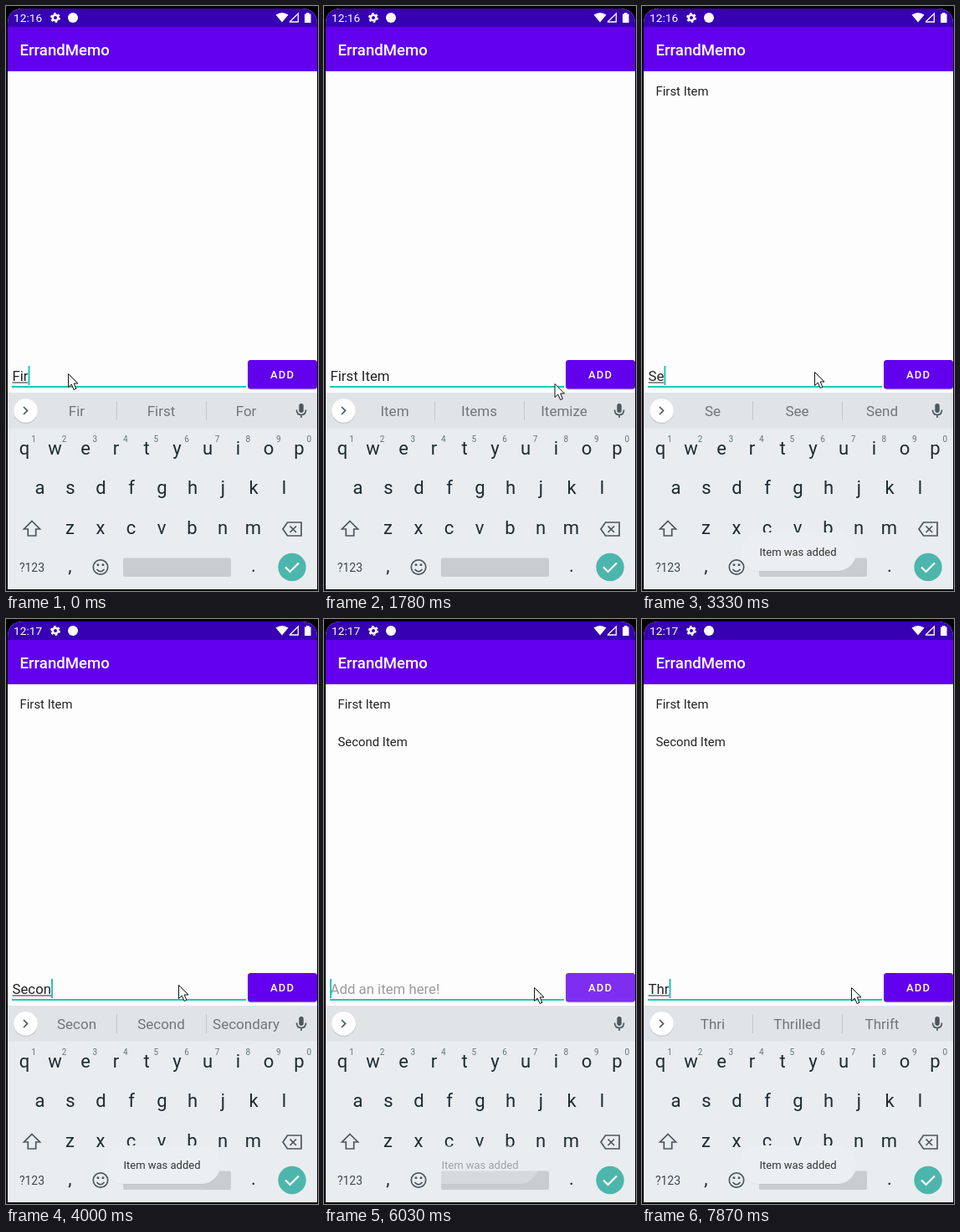
Write an HTML page that moves like this. It is 373 by 699 pixels and loops after 7.99 s.

```html
<!DOCTYPE html>
<html lang="en">
<head>
<meta charset="utf-8">
<title>To-do list demo</title>
<style>
  html, body { margin: 0; width: 100%; height: 100%; overflow: hidden; background: #000; }
  svg { display: block; width: 373px; height: 699px; font-family: Roboto, sans-serif; }
  text { white-space: pre; }
  .mid { text-anchor: middle; }
  .key { font-size: 22px; fill: #1d2b32; }
  .hint { font-size: 10px; fill: #66737a; }
  .small { font-size: 14px; fill: #3c484f; }
  .suggest { font-size: 17px; fill: #6f767b; }
  .item { font-size: 14.9px; fill: #222; }
  .line { fill: none; stroke: #4b575e; stroke-width: 1.7; }
</style>
</head>
<body>
<svg viewBox="0 0 373 699">
  <clipPath id="screen"><path d="M2 697V22Q2 3 21 3H353Q372 3 372 22V697Z"/></clipPath>
  <g clip-path="url(#screen)">
    <rect width="373" height="699" fill="#fdfdfd"/>
    <rect width="373" height="26" fill="#3700b3"/>
    <rect y="25" width="373" height="53" fill="#6200ee"/>

    <!-- status bar -->
    <g fill="#fff">
      <text id="clock" x="9" y="19" font-size="13.7"></text>
      <circle cx="59" cy="14" r="3.3" fill="none" stroke="#fff" stroke-width="2.6"/>
      <circle cx="59" cy="14" r="5.1" fill="none" stroke="#fff" stroke-width="1.8" stroke-dasharray="2.67"/>
      <circle cx="80" cy="14" r="6"/>
      <path d="M322.500 10.500Q330 5.500 337.500 10.500L330 19.500Z"/>
      <path d="M339.500 19V18.500L349.300 9V19Z" fill="none" stroke="#fff" stroke-width="1.3"/>
      <path d="M357 9.500H359V8H362.500V9.500H364.500V20H357Z"/>
    </g>
    <text x="16.500" y="59" font-size="18.600" font-weight="500" fill="#fff">ErrandMemo</text>

    <text class="item" id="first" x="16.500" y="106.500">First Item</text>
    <text class="item" id="second" x="16.500" y="151.500">Second Item</text>

    <!-- entry row -->
    <text id="hint" x="7.500" y="448" font-size="16.800" fill="#9a9a9a">Add an item here!</text>
    <text id="entry" x="7.500" y="448" font-size="16.800" fill="#222"></text>
    <rect id="underline" y="449.500" height="1" fill="#222"/>
    <rect x="7" y="454" width="280" height="2" fill="#1bc8b8"/>
    <rect id="caret" y="430" width="2" height="23" fill="#1bc8b8"/>
    <rect x="289" y="424" width="83" height="34.500" rx="4" fill="#000" opacity=".2"/>
    <rect x="289" y="423" width="83" height="34.500" rx="3.500" fill="#6200ee"/>
    <rect id="ripple" x="289" y="423" width="83" height="34.500" rx="3.500" fill="#fff"/>
    <text x="316" y="445" font-size="13" font-weight="500" letter-spacing="1.160" fill="#fff">ADD</text>

    <!-- keyboard -->
    <rect y="462" width="373" height="43" fill="#e0e4e7"/>
    <rect y="504.500" width="373" height="195" fill="#e9edf0"/>
    <circle cx="23.500" cy="484.500" r="14.500" fill="#000" opacity=".13"/>
    <circle cx="23.500" cy="483.500" r="14.300" fill="#fff"/>
    <path class="line" d="M21 479L25.500 483.500L21 488"/>
    <g id="bar">
      <path d="M132.500 472V495M239.500 472V495" stroke="#c3c8cb"/>
      <text class="suggest mid" x="84.500" y="490"></text>
      <text class="suggest mid" x="185.500" y="490"></text>
      <text class="suggest mid" x="287" y="490"></text>
    </g>
    <rect x="350.300" y="475" width="5.400" height="11" rx="2.700" fill="#4b575e"/>
    <path class="line" d="M347.500 482.500Q347.500 488.500 353 488.500T358.500 482.500M353 488.500V492"/>
    <g id="keys"></g>
    <path class="line" d="M31 615.500L40.500 625H35.700V633H26.300V625H21.500Z"/>
    <path class="line" d="M336.500 617H353V633H336.500L331 625ZM339.500 621.500L347 629M347 621.500L339.500 629"/>
    <text class="small mid" x="31" y="675.500">?123</text>
    <text class="key mid" x="76.500" y="676">,</text>
    <text class="key mid" x="296" y="676">.</text>
    <circle class="line" cx="113" cy="670.500" r="8.700"/>
    <path class="line" d="M108.500 673Q113 678.500 117.500 673"/>
    <path d="M108.700 667.800h2.600M114.700 667.800h2.600" stroke="#4b575e" stroke-width="2.600"/>
    <rect x="140" y="659.500" width="129" height="22.500" rx="2" fill="#c9cdd0"/>
    <circle cx="342" cy="670.500" r="16.700" fill="#4db6ac"/>
    <path d="M334 670.500L339.500 676L350 665.500" fill="none" stroke="#fff" stroke-width="2.200"/>

    <g id="toast">
      <rect x="117.500" y="630" width="138.500" height="46" rx="22" fill="#000" opacity=".03"/>
      <rect x="117.500" y="629" width="138.500" height="46" rx="22" fill="#eceff1"/>
      <text class="mid" x="186.500" y="657" font-size="13" fill="#333">Item was added</text>
    </g>
    <path id="mouse" d="M0 0V16L3.800 12.600L6.600 19L9.400 17.800L6.700 11.500H11.500Z" fill="#fff" stroke="#111" stroke-linejoin="round"/>
  </g>
</svg>
<script>
const LOOP = 7990;
const $ = id => document.getElementById(id);

// Time, entry ("|" starts the underlined word), suggestions
const typing = [
  [0, "|Fir", "Fir First For"],
  [250, "|Firs", "Firs First Firsthand"],
  [530, "|First", "First Firsts Firstly"],
  [650, "First ", "of day time"],
  [770, "First |I", "I I'm It"],
  [890, "First |It", "It It's Its"],
  [1010, "First |Ite", "Ite Item It"],
  [1130, "First Item", "Item Items Itemize"],
  [2320, "", ""],
  [3050, "|S", "S So Sorry"],
  [3330, "|Se", "Se See Send"],
  [3610, "|Sec", "Sec Second Seconds"],
  [4000, "|Secon", "Secon Second Secondary"],
  [4250, "Second ", "time one half"],
  [4520, "Second |I", "I I'm It"],
  [4640, "Second |It", "It It's Its"],
  [4760, "Second |Ite", "Ite Item It"],
  [4900, "Second Item", "Item Items Itemize"],
  [6030, "", ""],
  [6980, "|T", "T The They"],
  [7100, "|Th", "Th The Thank"],
  [7220, "|Thr", "Thr Through Three"],
  [7340, "|Thri", "Thri Thrilled Thrift"],
  [7870, "|Thr", "Thri Thrilled Thrift"]
];
const pointer = [
  [0, 74.5, 439.5], [1630, 107.5, 442], [1780, 276, 451.5], [1930, 318, 440],
  [2320, 217.5, 434.5], [2440, 209, 436.5], [2560, 206.5, 437.5],
  [5270, 238, 440], [5390, 292, 442], [5510, 318, 440],
  [6030, 251.5, 440.5], [6150, 250.5, 440.5]
];
const ripple = [
  [0, 0], [2050, .08], [2170, .18], [2440, .08], [2560, 0],
  [5750, .08], [5870, .18], [6150, .08], [6270, 0]
];
const toast = [
  [0, 0], [2320, .4], [2440, .8], [2560, 1], [4250, .85], [4400, .35], [4520, 0],
  [6030, .4], [6150, .8], [6270, .95], [6420, 1]
];
const caret = [
  [0, 1], [1630, 0], [2170, 1], [2680, 0], [3050, 1],
  [5390, 0], [5870, 1], [6420, 0], [6980, 1]
];

const at = (steps, t) => steps.findLast(s => s[0] <= t);
const show = (id, opacity) => $(id).setAttribute("opacity", +opacity);

function buildKeys() {
  const label = (cls, x, y, s) => `<text class="${cls} mid" x="${x}" y="${y}">${s}</text>`;
  const rows = [["qwertyuiop", 22, 535.5], ["asdfghjkl", 40.5, 583], ["zxcvbnm", 76.5, 630.5]];
  $("keys").innerHTML = rows.map(([letters, x, y], row) =>
    [...letters].map((c, i) => label("key", x + 36.5 * i, y, c) +
      (row ? "" : label("hint", 33 + 36.6 * i, 520.5, (i + 1) % 10))).join("")).join("");
}

function measure(s) {
  $("entry").textContent = s;
  return s ? $("entry").getComputedTextLength() : 0;
}

function draw(t) {
  const [, marked, words] = at(typing, t);
  const [before, word = ""] = marked.split("|");
  const start = measure(before);
  const end = measure(before + word);
  $("underline").setAttribute("x", 7.5 + start);
  $("underline").setAttribute("width", word ? end - start : 0);
  $("caret").setAttribute("x", marked ? 7.5 + end : 7);
  const list = words.split(" ");
  $("bar").querySelectorAll("text").forEach((el, i) => el.textContent = list[i] || "");
  show("bar", words !== "");
  show("hint", marked === "");
  show("caret", at(caret, t)[1]);
  show("first", t >= 2320);
  show("second", t >= 6030);
  show("ripple", at(ripple, t)[1]);
  show("toast", at(toast, t)[1]);
  $("clock").textContent = t < 4000 ? "12:16" : "12:17";
  const [, x, y] = at(pointer, t);
  $("mouse").setAttribute("transform", `translate(${x} ${y})`);
}

buildKeys();
const begin = performance.now();
function tick() {
  draw((performance.now() - begin) % LOOP);
  requestAnimationFrame(tick);
}
tick();
</script>
</body>
</html>
```
